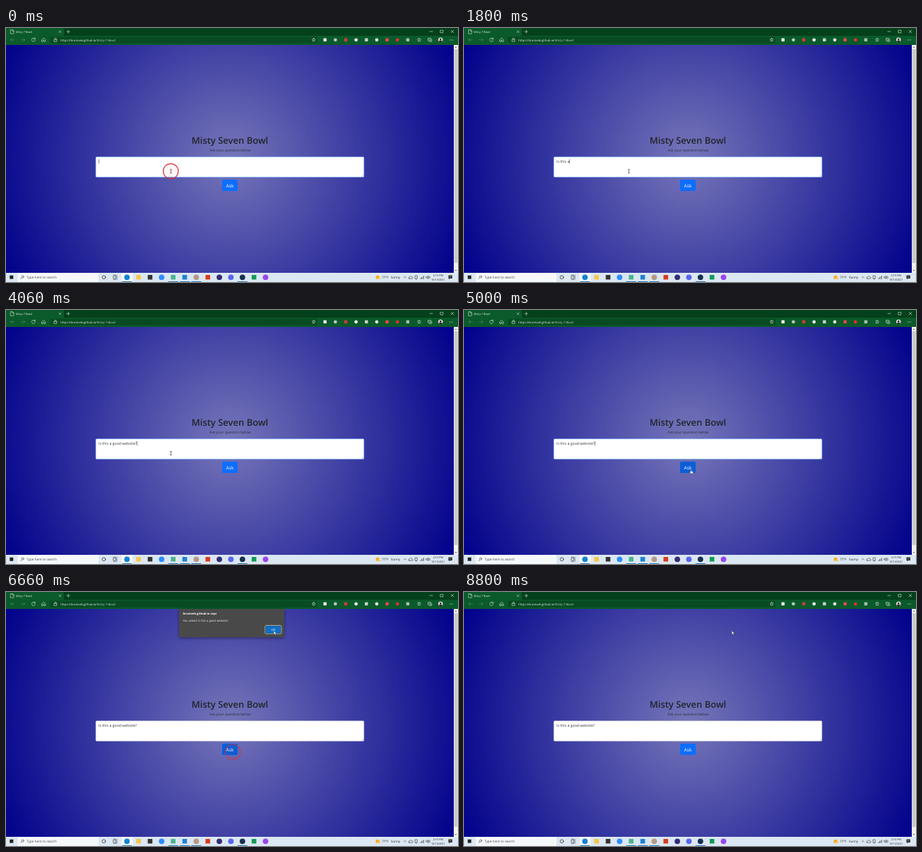
Animation of 640x360 px, one loop 8.86 s. Source, as an HTML page:

```html
<!DOCTYPE html>
<html lang="en">
<head>
<meta charset="utf-8">
<title>Misty 7 Bowl</title>
<style>
  html, body { margin: 0; width: 100%; height: 100%; overflow: hidden; }
  svg { display: block; width: 100%; height: 100%; }
  text { font-family: "Open Sans", "Noto Sans", sans-serif; text-rendering: geometricPrecision; white-space: pre; }
  .line { fill: none; stroke-width: .6; stroke-linecap: round; stroke-linejoin: round; }
</style>
</head>
<body>
<svg viewBox="0 0 640 360" preserveAspectRatio="none">
  <defs>
    <radialGradient id="glow" gradientUnits="userSpaceOnUse" cx="317" cy="186" r="356">
      <stop offset="0" stop-color="#7676b9"/><stop offset="1" stop-color="#00008b"/>
    </radialGradient>
    <filter id="shadow" x="-10%" y="-10%" width="120%" height="140%">
      <feDropShadow dx="0" dy="1.5" stdDeviation="2" flood-opacity=".4"/>
    </filter>
  </defs>

  <!-- Page -->
  <rect y="24" width="634" height="323" fill="url(#glow)"/>
  <text x="317" y="164" font-size="13" font-weight="600" text-anchor="middle" fill="#212529">Misty Seven Bowl</text>
  <text x="317.3" y="175.4" font-size="5.1" text-anchor="middle" fill="#2b2e3c">Ask your question below</text>
  <rect id="boxRing" x="126.4" y="181.9" width="381.2" height="30.2" rx="2" fill="#0d6efd" opacity=".35"/>
  <rect id="box" x="127.2" y="182.7" width="379.6" height="28.6" rx="1.3" fill="#fff" stroke-width=".5"/>
  <path class="line" d="M504 210.3l2-2M505.3 210.3l.7-.7" stroke="#777" style="stroke-width:.35"/>
  <text id="question" x="131" y="191" font-size="5.2" fill="#33373b"></text>
  <rect id="caret" y="185.8" width=".5" height="6.4" fill="#222"/>
  <rect id="askRing" x="304.9" y="213.9" width="24.2" height="18.2" rx="2.4" fill="#317efd" opacity=".5"/>
  <rect id="ask" x="306" y="215" width="22" height="16" rx="1.6"/>
  <text x="317" y="225.7" font-size="6.6" text-anchor="middle" fill="#fff">Ask</text>
  <circle id="click" r="10.7" fill="#d22" fill-opacity=".04" stroke="#d1353f" stroke-width="1.2"/>

  <rect x="634" y="24" width="6" height="323" fill="#f1f1f1"/>
  <rect x="634.6" y="30" width="4.8" height="303" fill="#c9c9c9"/>
  <path d="M635.6 28l1.4-1.6 1.4 1.6zM635.6 343l1.4 1.6 1.4-1.6z" fill="#555"/>

  <!-- Browser frame -->
  <rect width="640" height="11" fill="#04401b"/>
  <path d="M0 11V0H80q2 0 2 2V11H640V24H0z" fill="#0b5a2b"/>
  <rect x="62" y="12.4" width="379" height="9.4" rx="1.5" fill="#084b22"/>
  <g class="line" stroke="#dcebe0">
    <path d="M6.7 2.5h2.7l1.6 1.6v4H6.7zM9.2 2.5v1.8h1.8M75.2 4l2.6 2.6m0-2.6l-2.6 2.6M86 5.2h4.4M88.2 3v4.4"/>
    <path d="M600 5h4M615.3 3.2h3.6v3.6h-3.6zM630.2 3.2l3.6 3.6m0-3.6l-3.6 3.6"/>
    <path d="M12 16.8H6.6m2.3-2.3l-2.3 2.3 2.3 2.3M21.4 16.8h5.4m-2.3-2.3l2.3 2.3-2.3 2.3" opacity=".35"/>
    <path d="M41 15.4a2.5 2.5 0 1 0 .4 1.6M41.2 13.8v1.8h-1.8M50.8 16.5l2.5-2.2 2.5 2.2v2.8h-1.7v-1.8h-1.6v1.8h-1.7z"/>
    <path d="M68.3 16.2h3.6v3h-3.6zM69 16.2v-.9a1.1 1.1 0 0 1 2.2 0v.9"/>
    <path d="M435.7 14.3l.7 1.5 1.7.2-1.2 1.2.3 1.7-1.5-.8-1.5.8.3-1.7-1.2-1.2 1.7-.2z"/>
    <path d="M585 14.3l.7 1.5 1.7.2-1.2 1.2.3 1.7-1.5-.8-1.5.8.3-1.7-1.2-1.2 1.7-.2z"/>
    <path d="M598 14.5h3.4v3.4H598zM599.3 19.2h3.5v-3.3M600 16.2h-1"/>
    <path d="M628.4 17h.1m1.9 0h.1m1.9 0h.1" style="stroke-width:.9"/>
  </g>
  <text x="14" y="6.8" font-size="3.9" fill="#eef5f0">Misty 7 Bowl</text>
  <text x="77.3" y="18.5" font-size="4.2" fill="#bcd4c5"><tspan fill="#f2f7f4">https://brumvek.github.io</tspan>/Misty-7-Bowl/</text>
  <g id="extensions"></g>
  <circle cx="615.3" cy="16.8" r="3.2" fill="#e9e4df"/>
  <path d="M612.7 18.8q2.6-2.4 5.2 0a3.2 3.2 0 0 1-5.2 0z" fill="#222"/>
  <circle cx="615.3" cy="16" r="1.3" fill="#222"/>

  <!-- Taskbar -->
  <rect y="347" width="640" height="13" fill="#dbe7f2"/>
  <rect x="5.3" y="350.7" width="5" height="5" fill="#222"/>
  <rect x="16.5" y="347.2" width="114.5" height="12.8" fill="#f6f9fc"/>
  <rect x="163.5" y="347" width="16" height="13" fill="#f4f9fd"/>
  <g class="line" stroke="#333">
    <circle cx="23.6" cy="352.6" r="1.6"/><path d="M22.4 353.9l-1.7 1.8"/>
    <circle cx="138.5" cy="353.3" r="2.4" style="stroke-width:.8"/>
    <path d="M152.2 351.6h3.4v3.4h-3.4zM152.2 350.2h3.4M152.2 356.4h3.4M157 350.5v5.8"/>
    <path d="M563.3 354l1.6-1.5 1.6 1.5M571 355.2h4a1.1 1.1 0 0 0 0-2.2 2 2 0 0 0-3.6-.2 1.2 1.2 0 0 0-.4 2.4z"/>
    <path d="M579.5 351h2.8v4.2h-2.8zM580.9 355.2v1.2"/>
    <path d="M587 355.5v-1m1.5 1v-2m1.5 2v-3m1.5 3v-4"/>
    <path d="M595 352.7h1l1.4-1.3v4l-1.4-1.3h-1zM598.5 352.3q1 1 0 2.2M599.6 351.5q1.8 1.9 0 3.8"/>
  </g>
  <path d="M626.5 350.6h5.3v4.3h-3.1l-1.2 1.5v-1.5h-1z" fill="#222"/>
  <path d="M627.6 352h3m-3 1.3h3" stroke="#dbe7f2" stroke-width=".4"/>
  <text x="29" y="355.2" font-size="4.7" fill="#444">Type here to search</text>
  <g id="apps"></g>
  <circle cx="526.2" cy="353.4" r="2.7" fill="#f7a81b"/>
  <path d="M525.5 356h4a1 1 0 0 0 0-2 1.5 1.5 0 0 0-2.8 0 1 1 0 0 0-1.2 2z" fill="#f3c65b"/>
  <g fill="#222">
    <text x="532.3" y="355.2" font-size="4.5">77°F</text>
    <text x="545" y="355.2" font-size="4.5">Sunny</text>
    <text x="611.8" y="352.2" font-size="3.8" text-anchor="middle">2:15 PM</text>
    <text x="611.8" y="358.2" font-size="3.7" text-anchor="middle">10/14/2021</text>
  </g>

  <!-- Alert -->
  <g id="alert">
    <path d="M245 24h149v38q0 2-2 2H247q-2 0-2-2z" fill="#4a4a4a" filter="url(#shadow)"/>
    <text x="250.5" y="32.3" font-size="4.1" font-weight="700" fill="#fff">brumvek.github.io says</text>
    <text id="message" x="250.5" y="41.7" font-size="4.1" fill="#f0f0f0"></text>
    <rect id="okRing" x="366.9" y="47.4" width="23" height="11.8" rx="1.4" fill="#222" stroke="#e8eef4" stroke-width=".7"/>
    <rect x="367.7" y="48.2" width="21.4" height="10.2" rx="1" fill="#1070c4"/>
    <text x="378.4" y="54.8" font-size="4.2" text-anchor="middle" fill="#fff">OK</text>
  </g>

  <!-- Mouse pointers, centred on their own origin -->
  <path id="beam" class="line" d="M-1-2.7q1 0 1 .6V2.1q0 .6-1 .6M1-2.7q-1 0-1 .6M1 2.7q-1 0-1-.6" stroke="#222"/>
  <path id="hand" d="M-1.2-2.6q.6-.7 1.1 0V-.7l2 .5q.7.2.6 1L2 2.9H-.9L-2.5.7q0-.8.7-.5l.6.5z" fill="#fff" stroke="#222" stroke-width=".4"/>
  <path id="arrow" d="M-1.3-2.9V2.1l1.1-1 .8 1.8.9-.4L.8.7h1.6z" fill="#fff" stroke="#222" stroke-width=".35"/>
</svg>
<script>
const LOOP = 8860;
const QUESTION = "Is this a good website?";
const TYPE_START = 490, TYPE_STEP = 140;
const TYPE_END = TYPE_START + TYPE_STEP * QUESTION.length;
const CLICK_ASK = 5400, ALERT_OPEN = 5530, ALERT_NEXT = 6700, ALERT_CLOSE = 8130;
const FIELD = [233.5, 203], BUTTON = [322, 229], OK = [380.5, 58];

const $ = id => document.getElementById(id);
const show = (id, on) => $(id).setAttribute("visibility", on ? "visible" : "hidden");
const clamp01 = v => Math.min(1, Math.max(0, v));
const progress = (t, from, to) => clamp01((t - from) / (to - from));
const ease = p => p * p * (3 - 2 * p);
const curve = (a, c, b, p) => a.map((v, i) => (1 - p) ** 2 * v + 2 * p * (1 - p) * c[i] + p * p * b[i]);
const dot = (x, y, r, color) => `<circle cx="${x}" cy="${y}" r="${r}" fill="${color}"/>`;
const square = (x, y, s, color) => `<rect x="${x - s / 2}" y="${y - s / 2}" width="${s}" height="${s}" rx=".6" fill="${color}"/>`;

const extensionColors = ["#f2f2f2", "#b9c5bd", "#d33a34", "#f0f0f0", "#c9d2cc", "#dfe8e2", "#e5484d", "#e0312f", "#a5bfae"];
$("extensions").innerHTML = extensionColors.map((color, i) => {
  const x = 451.7 + i * 14.65;
  return i % 2 ? dot(x, 16.8, 2.4, color) : square(x, 16.8, 4.4, color);
}).join("");

// [colour, round, running]
const apps = [
  ["#1683cf", 1, 1], ["#f5c64b", 0, 0], ["#333", 0, 0], ["#2d8cff", 1, 0], ["#4ab58a", 0, 1],
  ["#1f83ce", 0, 1], ["#b59a86", 1, 1], ["#d83b1e", 0, 0], ["#342d72", 1, 0], ["#5865f2", 1, 0],
  ["#16324f", 1, 1], ["#139a55", 0, 0], ["#9a45ee", 1, 0]
];
$("apps").innerHTML = apps.map(([color, round, running], i) => {
  const x = 171.3 + i * 16.35;
  const line = running ? `<rect x="${x - 7}" y="359" width="14" height="1" fill="#2678bd"/>` : "";
  return line + (round ? dot(x, 353.3, 3.9, color) : square(x, 353.3, 6.6, color));
}).join("");

function pointerAt(t) {
  if (t < 5600) return curve(FIELD, [278, 222], BUTTON, ease(progress(t, 4060, 4700)));
  return curve(BUTTON, [401, 131], OK, ease(progress(t, 5600, 6260)));
}

function clickCircle(t) {
  const onField = t < CLICK_ASK;
  const [x, y] = onField ? [233.3, 203] : [321.3, 226.7];
  // The page, and so the circle, stands still while an alert is open.
  const opacity = onField ? 1 - progress(t, 60, 460) : .8 * (1 - progress(t, ALERT_CLOSE, 8400));
  $("click").setAttribute("transform", `translate(${x} ${y})`);
  $("click").setAttribute("opacity", opacity);
}

function draw(t) {
  const typed = Math.min(QUESTION.length, Math.max(0, Math.floor((t - TYPE_START) / TYPE_STEP)));
  const focused = t < CLICK_ASK;
  const alertOpen = t >= ALERT_OPEN && t < ALERT_CLOSE;
  const [x, y] = pointerAt(t);
  const overButton = x > 306 && x < 328 && y > 215 && y < 232;

  $("question").textContent = QUESTION.slice(0, typed);
  $("caret").setAttribute("x", 131.2 + (typed ? $("question").getComputedTextLength() : 0));
  const idle = t > TYPE_END ? t - TYPE_END : 0;
  show("caret", focused && Math.floor(idle / 530) % 2 === 0);
  show("boxRing", focused);
  $("box").setAttribute("stroke", focused ? "#86b7fe" : "#ced4da");

  $("ask").setAttribute("fill", overButton || alertOpen ? "#0b5ed7" : "#0d6efd");
  show("askRing", t >= CLICK_ASK && t < ALERT_CLOSE);
  clickCircle(t);

  show("alert", alertOpen);
  show("okRing", alertOpen && t < ALERT_NEXT);
  $("message").textContent = t < ALERT_NEXT
    ? "You asked: " + QUESTION
    : "The seven bowl answered: Signs point to yes.";

  const pointer = t >= 5600 && y < 64 ? "arrow" : overButton || t >= 5600 ? "hand" : y < 211.5 ? "beam" : "arrow";
  for (const id of ["beam", "hand", "arrow"]) {
    show(id, id === pointer);
    $(id).setAttribute("transform", `translate(${x} ${y})`);
  }
}

const start = performance.now();
function frame() {
  draw((performance.now() - start) % LOOP);
  requestAnimationFrame(frame);
}
frame();
</script>
</body>
</html>
```
